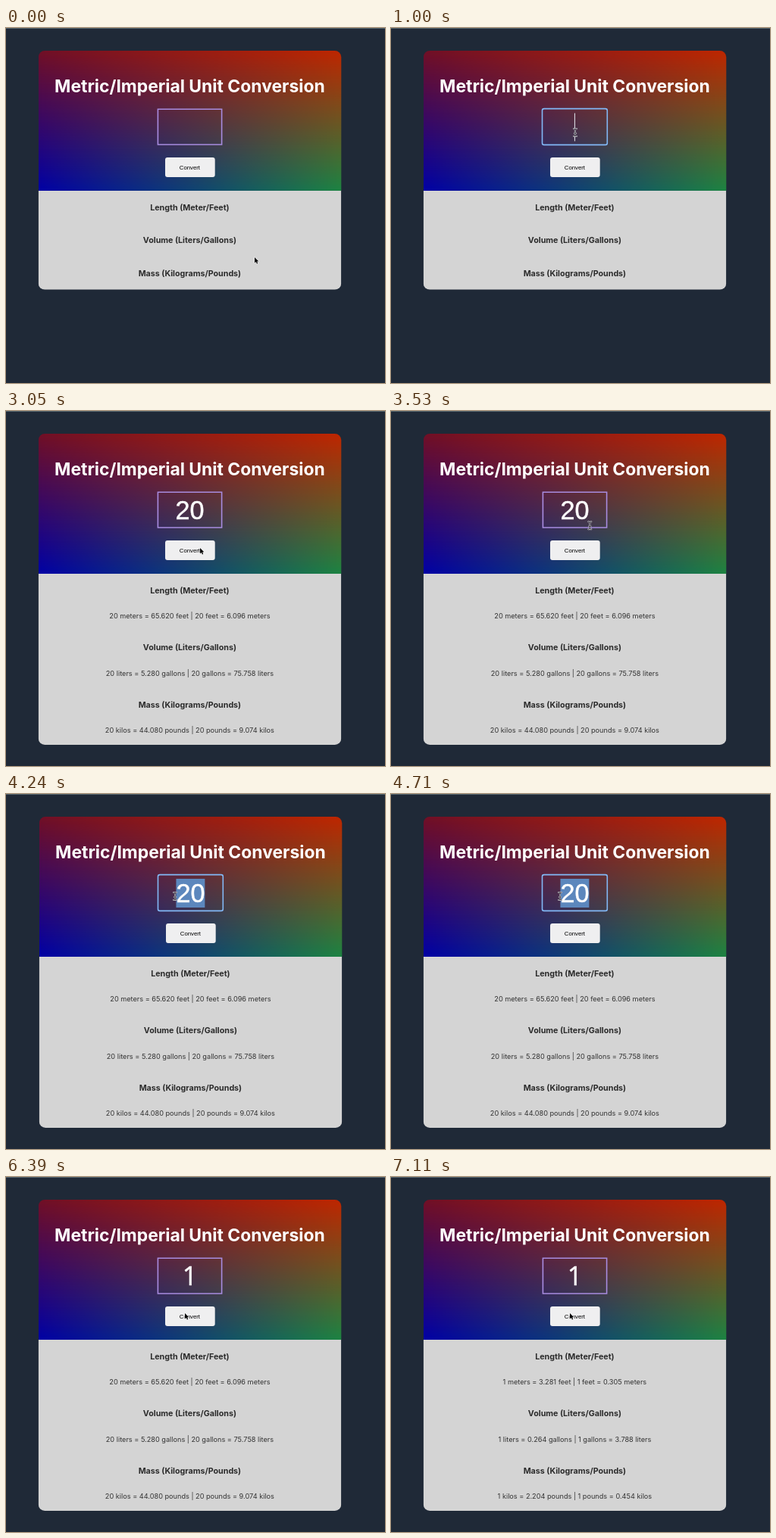
An HTML page with a canvas that plays this animation: 500 by 469 pixels, repeating every 7970 ms.

```html
<!DOCTYPE html>
<html lang="en">
<head>
<meta charset="utf-8">
<title>Metric/Imperial Unit Conversion</title>
<style>
html, body { margin: 0; width: 100%; height: 100%; overflow: hidden; background: #1f2937; }
canvas { display: block; width: 500px; height: 469px; }
</style>
</head>
<body>
<canvas id="stage"></canvas>
<script>
const LOOP = 7970, W = 500, H = 469;
const CARD = { x: 42.7, y: 30, w: 399.6, split: 215 };
const MID = 242.4;
const REM = 9.16;
const SANS = '"Liberation Sans", Arial, sans-serif';
const INTER = 'Inter, sans-serif';

// Events, in ms
const FOCUS = 1000, TYPE_2 = 1740, TYPE_0 = 1950, BLUR = 2960, CONVERT = 3000;
const REFOCUS = 3750, NUDGE = 4110, NUDGE_END = 4630, TYPE_1 = 4820;
const WAKE = 5640, BLUR_2 = 6390, CONVERT_2 = 6480;
const BLINK = 520;

const canvas = document.getElementById('stage');
const dpr = window.devicePixelRatio || 1;
canvas.width = W * dpr;
canvas.height = H * dpr;
const ctx = canvas.getContext('2d');
ctx.scale(dpr, dpr);

const lerp = (a, b, k) => a + (b - a) * k;
const ease = k => k * k * (3 - 2 * k);
const clamp = k => Math.min(1, Math.max(0, k));
const within = (t, a, b) => t >= a && t < b;

// Bilinear blend of four corner colours
function makeHeader() {
  const h = CARD.split - CARD.y;
  const left = [[112, 15, 38], [0, 0, 165]];
  const right = [[190, 38, 0], [28, 132, 66]];
  const buf = document.createElement('canvas');
  buf.width = Math.ceil(CARD.w);
  buf.height = h;
  const c = buf.getContext('2d');
  const blend = ([a, b], k) => `rgb(${a.map((n, i) => Math.round(lerp(n, b[i], k)))})`;
  for (let y = 0; y < h; y++) {
    const grad = c.createLinearGradient(0, 0, buf.width, 0);
    grad.addColorStop(0, blend(left, y / h));
    grad.addColorStop(1, blend(right, y / h));
    c.fillStyle = grad;
    c.fillRect(0, y, buf.width, 1);
  }
  return buf;
}
const header = makeHeader();

// Pointer moves: start, end, x, y
const MOVES = [
  [30, 740, 243, 138],
  [2470, 2660, 250, 155],
  [2660, 2900, 256, 181],
  [3290, 3700, 266, 134],
  [3780, 4200, 223, 135],
  [5740, 6240, 236, 180]
];

function pointer(t) {
  let x = 328, y = 303;
  for (const [start, end, toX, toY] of MOVES) {
    const k = ease(clamp((t - start) / (end - start)));
    x = lerp(x, toX, k);
    y = lerp(y, toY, k);
  }
  return { x, y };
}

function state(t) {
  const mouse = pointer(t);
  const focus = within(t, FOCUS, BLUR) || within(t, REFOCUS, BLUR_2);
  const dragging = within(t, 3780, TYPE_1);
  const selected = !dragging ? 0 : mouse.x < 234 ? 2 : mouse.x < 252 ? 1 : 0;
  const lastInput = Math.max(...[FOCUS, TYPE_2, TYPE_0, REFOCUS, TYPE_1].filter(e => e <= t));
  return {
    mouse, focus, selected,
    caret: focus && !selected && (t - lastInput) % (2 * BLINK) < BLINK,
    hidden: within(t, TYPE_2, 2470) || within(t, TYPE_1, WAKE),
    value: t < TYPE_2 ? '' : t < TYPE_0 ? '2' : t < TYPE_1 ? '20' : '1',
    shift: within(t, NUDGE, NUDGE_END) ? 1 : 0,
    result: t < CONVERT ? 0 : t < CONVERT_2 ? 20 : 1
  };
}

function text(str, y, font, color) {
  ctx.font = font;
  ctx.fillStyle = color;
  ctx.textAlign = 'center';
  ctx.fillText(str, MID, y);
}

function box(x, y, w, h, r) {
  ctx.beginPath();
  ctx.roundRect(x, y, w, h, r);
}

const UNITS = [
  ['Length (Meter/Feet)', 'meters', 'feet', 3.281],
  ['Volume (Liters/Gallons)', 'liters', 'gallons', 0.264],
  ['Mass (Kilograms/Pounds)', 'kilos', 'pounds', 2.204]
];

function drawResults(n) {
  UNITS.forEach(([title, a, b, rate], i) => {
    const y = 240.8 + i * (n ? 75.4 : 43.5);
    text(title, y, `700 ${REM * 1.17}px ${INTER}`, '#2c2c2c');
    if (!n) return;
    const line = `${n} ${a} = ${(n * rate).toFixed(3)} ${b} | ${n} ${b} = ${(n / rate).toFixed(3)} ${a}`;
    text(line, y + 33.4, `400 ${REM}px ${INTER}`, '#333');
  });
}

function drawInput(s) {
  if (s.focus) box(199.5, 106.6, 85.8, 47.8, 2.5);
  else box(200.4, 107.3, 84.2, 46.7, 0);
  ctx.strokeStyle = s.focus ? '#82b8f6' : '#a88ce0';
  ctx.lineWidth = 1.6;
  ctx.stroke();

  const digit = REM * 2.07, right = MID + s.value.length * digit / 2;
  if (s.selected) {
    ctx.fillStyle = '#5c87bd';
    ctx.fillRect(right - s.selected * digit, 112, s.selected * digit, 38);
  }
  // A footless numeral one
  const face = s.value === '1' ? '"Open Sans", sans-serif' : SANS;
  text(s.value, 142.8, `400 ${REM * 3.73}px ${face}`, '#fff');
  ctx.strokeStyle = '#fff';
  ctx.lineWidth = 0.5;
  ctx.strokeText(s.value, MID, 142.8);
  if (s.caret) {
    ctx.fillStyle = '#d8d8de';
    ctx.fillRect(right - 0.5, 112.5, 1.1, 37);
  }
}

function drawCard(s) {
  const bottom = s.result ? 441 : 345.7;
  ctx.save();
  ctx.translate(s.shift, 0);
  ctx.save();
  box(CARD.x, CARD.y, CARD.w, bottom - CARD.y, 8.5);
  ctx.clip();
  ctx.drawImage(header, CARD.x, CARD.y);
  ctx.fillStyle = '#d4d4d4';
  ctx.fillRect(CARD.x, CARD.split, CARD.w, bottom - CARD.split);
  ctx.restore();

  text('Metric/Imperial Unit Conversion', 85, `700 ${REM * 2.5}px ${INTER}`, '#fff');
  drawInput(s);
  box(210, 171, 65.7, 26, 3);
  ctx.fillStyle = '#efeff0';
  ctx.fill();
  text('Convert', 186.7, `400 ${REM * 0.845}px ${SANS}`, '#000');
  drawResults(s.result);
  ctx.restore();
}

function drawArrow() {
  ctx.scale(0.86, 0.86);
  const arrow = new Path2D('M0 0V8.6L2 6.8 3.4 10 4.9 9.4 3.5 6.3 6.1 6.1Z');
  ctx.lineJoin = 'round';
  ctx.lineWidth = 1.3;
  ctx.strokeStyle = '#f4f4f4';
  ctx.stroke(arrow);
  ctx.fillStyle = '#000';
  ctx.fill(arrow);
}

function drawBeam() {
  ctx.beginPath();
  for (const d of [-1, 1]) {
    ctx.moveTo(-2, 5 * d);
    ctx.quadraticCurveTo(0, 5 * d, 0, 3.4 * d);
    ctx.quadraticCurveTo(0, 5 * d, 2, 5 * d);
  }
  ctx.moveTo(0, -4);
  ctx.lineTo(0, 4);
  ctx.moveTo(-1.2, 1.2);
  ctx.lineTo(1.2, 1.2);
  ctx.lineCap = 'round';
  for (const [w, color] of [[2, '#c9c9cf'], [0.8, '#2a2430']]) {
    ctx.lineWidth = w;
    ctx.strokeStyle = color;
    ctx.stroke();
  }
}

function drawPointer({ x, y }) {
  const overInput = within(x, 199, 286) && within(y, 106, 156);
  ctx.save();
  ctx.translate(x, y);
  overInput ? drawBeam() : drawArrow();
  ctx.restore();
}

function frame(now) {
  const s = state(now % LOOP);
  ctx.fillStyle = '#1f2937';
  ctx.fillRect(0, 0, W, H);
  ctx.fillStyle = '#56656d';
  ctx.fillRect(0, 0, W, 1);
  drawCard(s);
  if (!s.hidden) drawPointer(s.mouse);
  requestAnimationFrame(frame);
}
requestAnimationFrame(frame);
</script>
</body>
</html>
```
